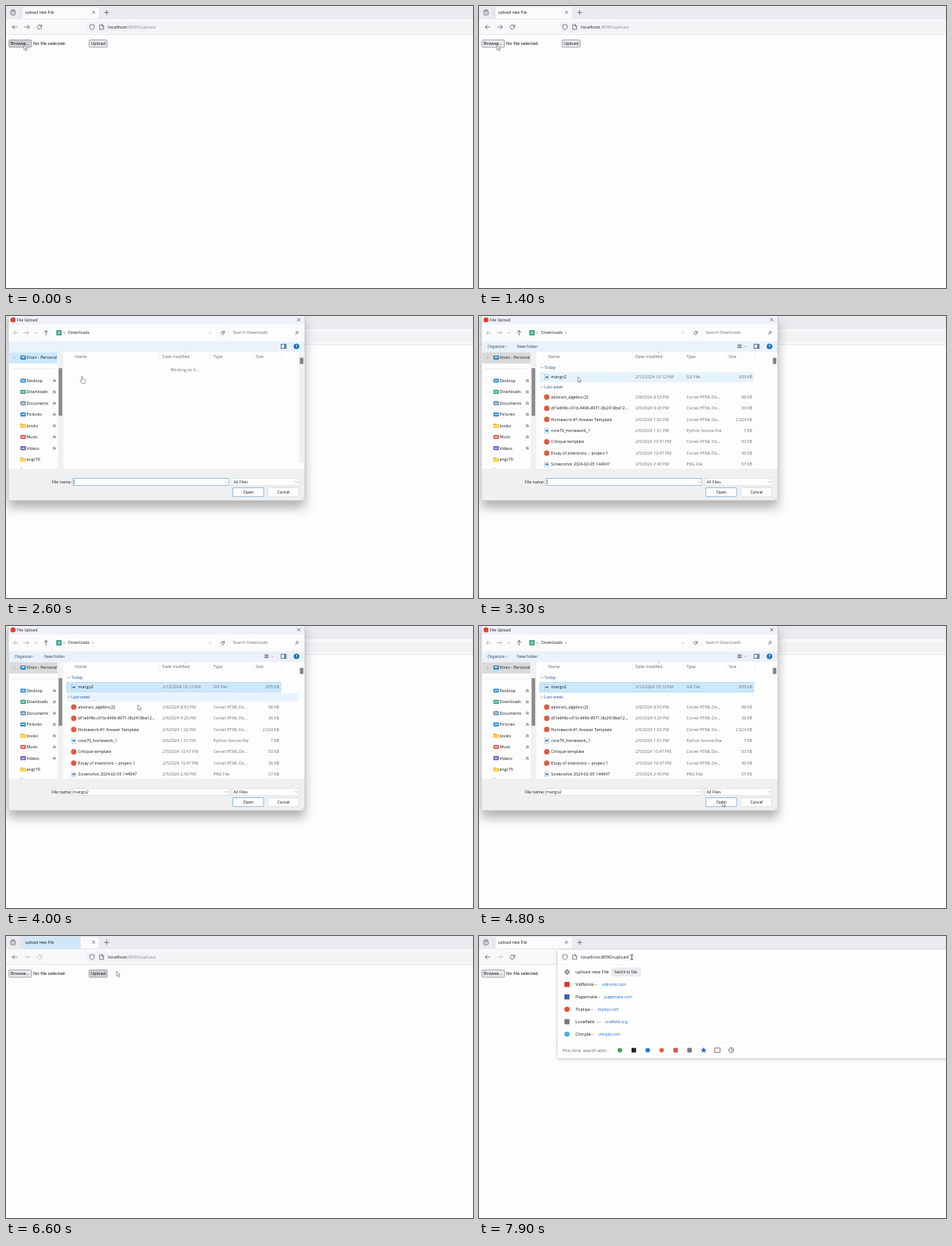
Animation, 600 px wide and 362 px high, one loop 8000 ms. Source, as an HTML page:

```html
<!DOCTYPE html>
<html lang="en">
<head>
<meta charset="utf-8">
<title>Upload form</title>
<style>
html, body { margin: 0; width: 100%; height: 100%; overflow: hidden; background: #fdfdfd; }
svg { display: block; width: 600px; height: 362px; font-family: "Open Sans", "Noto Sans", sans-serif; }
text { white-space: pre; }
</style>
</head>
<body>
<svg id="stage" viewBox="0 0 600 362"></svg>
<script>
const INK = '#1b1b1f', DIM = '#6c6c70', ICON = '#4a4a52';
const LOOP = 8000, STEP = 100;

// Markup helpers; text is placed by its vertical middle.
const text = (x, y, s, size = 5.25, fill = INK, more = '') =>
  `<text x="${x}" y="${y + size * 0.36}" font-size="${size}" fill="${fill}" ${more}>${s}</text>`;
const rect = (x, y, w, h, fill, more = '') =>
  `<rect x="${x}" y="${y}" width="${w}" height="${h}" fill="${fill}" ${more}/>`;
const dot = (x, y, r, fill) => `<circle cx="${x}" cy="${y}" r="${r}" fill="${fill}"/>`;
const line = (d, color = ICON, w = 0.7, more = '') =>
  `<path d="${d}" fill="none" stroke="${color}" stroke-width="${w}" stroke-linecap="round" stroke-linejoin="round" ${more}/>`;
const group = (id, body, more = '') => `<g id="${id}" ${more}>${body}</g>`;
const border = (color, w = 0.5, r = 0) => `stroke="${color}" stroke-width="${w}" rx="${r}"`;
const folder = (x, y) =>
  `<path d="M${x - 3.7} ${y - 2.7}h2.8l1 1h3.6v4.6h-7.4z" fill="#f0b93a"/>` +
  rect(x - 3.7, y - 0.9, 7.4, 3.6, '#ffd563', 'rx=".5"');
const leftArrow = (x, y, c, s = 1) =>
  line(`M${x + 3 * s} ${y}H${x - 3 * s}m2.4 -2.4l-2.4 2.4l2.4 2.4`, c);
const rightArrow = (x, y, c) => line(`M${x - 3} ${y}H${x + 3}m-2.4 -2.4l2.4 2.4l-2.4 2.4`, c);
const cross = (x, y, r) => line(`M${x - r} ${y - r}l${2 * r} ${2 * r}m0 ${-2 * r}l${-2 * r} ${2 * r}`);
const chevron = (x, y, c = '#77777c') => line(`M${x - 1.4} ${y - 0.7}l1.4 1.4l1.4 -1.4`, c, 0.5);
const nextMark = (x, y, c) => line(`M${x - 0.6} ${y - 1.2}l1.2 1.2l-1.2 1.2`, c, 0.6);
const clockwise = (x, y, r) =>
  line(`M${x + r * 0.85} ${y - r * 0.5}A${r} ${r} 0 1 0 ${x + r} ${y + 0.4}M${x + r} ${y - r}v${r * 0.75}h${-r * 0.75}`);
const pageIcon = (x, y) => line(`M${x - 2.2} ${y - 3}h2.8l1.8 1.8v4.2h-4.6zM${x + 0.5} ${y - 3}v2h2`);

function browser() {
  const shield = line('M110.5 23.8l2.8 1v2.2c0 1.8 -1.2 3 -2.8 3.6c-1.6 -.6 -2.8 -1.8 -2.8 -3.6v-2.2z');
  return rect(0, 0, 600, 17, '#ebebef') +
    rect(0, 17, 600, 20, '#f8f8fa') +
    rect(0, 36.4, 600, 0.7, '#dedee2') +
    rect(104, 20, 500, 14, '#f3f3f6', 'rx="2"') +
    line('M6.2 6.8v3.6q0 1 1 1h3.6q1 0 1 -1v-3.6zM7 5h4M8 8.4l1 1l1 -1', ICON) +
    rect(18.2, 3, 0.6, 11, '#cfcfd5') +
    rect(21, 1, 99, 15.5, '#fbfbfd', border('#dcdce1', 0.4, 2)) +
    `<clipPath id="tabClip"><rect x="21" y="1" width="99" height="15.5" rx="2"/></clipPath>` +
    `<g clip-path="url(#tabClip)"><circle id="burst" cx="29" cy="8.5" fill="#69b9ec"/></g>` +
    text(24.5, 8.2, 'upload new File', 5.1) + cross(112.5, 8, 1.6) +
    line('M126.6 8.3h5.4m-2.7 -2.7v5.4') +
    leftArrow(11, 27, ICON) + group('forward', rightArrow(27, 27, ICON)) +
    group('reload', clockwise(43, 27, 2.8)) + shield + pageIcon(123, 27) +
    text(131, 27, 'localhost<tspan fill="#8b8b93">:8090/upload</tspan>', 5.9);
}

function page() {
  return rect(3.8, 43.6, 29, 9.4, '', 'id="browse" ' + border('#85858c', 0.7, 1.4)) +
    text(6, 48.2, 'Browse...', 5.7, '#000') +
    `<text id="picked" x="35" y="50.3" font-size="5.7"></text>` +
    rect(106.8, 43.6, 23.2, 9.4, '', 'id="upload" ' + border('#85858c', 0.7, 1.4)) +
    text(109.3, 48.2, 'Upload', 5.5, '#000');
}

function sidebar() {
  const items = [['Desktop', '#2a8fd8'], ['Downloads', '#3aa77a'], ['Documents', '#6e8fae'],
    ['Pictures', '#2c8de0'], ['books'], ['Music', '#d9544f'], ['Videos', '#7b57c2'], ['engr79']];
  const rows = items.map(([name, color], i) => {
    const y = 83 + i * 14.45;
    const icon = color ? rect(18.5, y - 2.6, 7, 5.2, color, 'rx=".8"') +
      rect(20, y - 0.6, 4, 1.3, '#fff', 'opacity=".8"') : folder(22, y);
    const pin = i < 7 ? line(`M60.2 ${y + 1.8}l1.4 -1.4m-.9 -1.4l2.3 2.3m-1.8 -1.8l1.1 -1.2l1.7 1.7l-1.2 1.1`, '#66666b', 0.8) : '';
    return icon + text(26.5, y, name) + pin;
  }).join('');
  return `<clipPath id="sideClip"><rect x="3" y="46" width="63.2" height="150"/></clipPath>` +
    `<g clip-path="url(#sideClip)">` + rect(4, 46.5, 63, 14.5, '', 'id="account"') +
    nextMark(11, 53.5, '#888') + rect(18.5, 50.8, 7, 5.2, '#2a7fd0', 'rx="1"') +
    rect(20.4, 52, 3.2, 2, '#d8ecfb') + text(27, 53.6, 'Kiran - Personal') +
    rect(8, 67.7, 54, 0.6, '#d6d6d9') + rows + folder(22, 198) + '</g>' +
    rect(66.5, 46, 7.2, 150, '#f1f1f2') + rect(67.6, 67, 4.6, 61, '#8a8a8d');
}

function fileRows() {
  const web = 'Corvel HTML Do...';
  const files = [
    ['abstract_algebra (2)', '2/8/2024 8:53 PM', web, '98 KB'],
    ['df1e6f4b-c91b-4496-8971-0b2418be12...', '2/6/2024 9:26 PM', web, '36 KB'],
    ['Homework #1 Answer Template', '2/6/2024 1:02 PM', web, '2,524 KB'],
    ['core79_homework_1', '2/6/2024 1:01 PM', 'Python Source File', '7 KB'],
    ['Critique template', '2/5/2024 10:47 PM', web, '50 KB'],
    ['Essay of intentions -- project 1', '2/5/2024 10:47 PM', web, '36 KB'],
    ['Screenshot 2024-02-05 144047', '2/5/2024 2:40 PM', 'PNG File', '57 KB']];
  const row = (y, [name, date, type, size]) => {
    const icon = type === web ? dot(87, y, 3.5, '#dd5a42') :
      rect(84.6, y - 3.2, 5, 6.4, '#fff', border('#9aa4b0', 0.5)) + rect(85.4, y - 1.2, 3.4, 2.4, '#3b82bd');
    return icon + text(92.5, y, name) + text(201, y, date, 5.25, DIM) + text(266.5, y, type, 5.25, DIM) +
      text(351, y, size, 5.25, DIM, 'text-anchor="end"');
  };
  const heading = (y, s) => chevron(80.8, y, '#3165a8') + text(84, y, s, 5.25, '#26589f');
  return rect(78, 72.2, 275, 12.8, '', 'id="chosen" stroke-width=".5"') +
    rect(78, 86, 298, 11, '#eaf3fc', 'id="weekHover"') +
    heading(66.3, 'Today') + row(78.6, ['mango2', '2/12/2024 10:12 PM', 'GIF File', '655 KB']) +
    heading(91.3, 'Last week') + files.map((f, i) => row(104 + i * 14.4, f)).join('');
}

function dialog() {
  const columns = [['Name', 89], ['Date modified', 201], ['Type', 266.5], ['Size', 321]];
  const button = (x, s, c) => rect(x, 220.4, 39.6, 11.4, '#fdfdfd', border(c, 0.6, 0.4)) +
    text(x + 20, 226.2, s, 5.25, INK, 'text-anchor="middle"');
  return rect(3, -3, 381, 240, '#fdfdfd', 'rx="3" filter="url(#shade)"') +
    rect(3, 0, 381, 11, '#eff2f9') + rect(3, 11, 381, 21.5, '#fafbfd') +
    rect(3, 32.5, 381, 13.5, '#ebf1f9') +
    dot(9, 5, 3.2, '#e2412b') + text(14, 5.2, 'File Upload', 5.1) + cross(376, 4.8, 1.7) +
    leftArrow(12, 21.5, '#a5a5aa', 0.8) + rightArrow(26, 21.5, '#a5a5aa') + chevron(38.5, 21.7) +
    line('M51.5 24.5v-6m-2.4 2.4l2.4 -2.4l2.4 2.4') +
    rect(60, 15.2, 210, 12.8, '#fff', border('#eceef1', 0.4, 1)) +
    rect(64.5, 18, 7, 7, '#43a383', 'rx="1"') + line('M68 19.5v3.4m-1.4 -1.4l1.4 1.4l1.4 -1.4', '#fff') +
    nextMark(75, 21.6, '#555') + text(80, 21.6, 'Downloads') +
    group('pathEnd', nextMark(111.5, 21.6, '#555')) +
    chevron(262, 21.7) + clockwise(278.4, 21.7, 2) +
    rect(287.5, 15.2, 92.5, 12.8, '#fff', border('#eceef1', 0.4, 1)) +
    text(291.5, 21.6, 'Search Downloads', 5.2, DIM) +
    line('M372 23.6l1.5 -1.5') + '<circle cx="374.2" cy="21" r="1.5" fill="none" stroke="#4a4a52" stroke-width=".6"/>' +
    group('commands', text(11, 39.2, 'Organize', 5.2, '#1d3c6b') + chevron(34.8, 39.4) +
      text(49, 39.2, 'New folder', 5.2, '#1d3c6b') +
      line('M332.5 37h4.6m-4.6 1.8h4.6m-4.6 1.8h4.6', '#55555c', 0.9) + chevron(342.5, 39.2)) +
    rect(353.5, 36.2, 6.4, 5.4, '#fff', border('#44566f', 0.8)) + rect(357.2, 36.5, 2.6, 4.8, '#4a83bd') +
    dot(373.2, 39, 3.6, '#1670bd') + text(373.2, 39, '?', 5, '#fff', 'text-anchor="middle" font-weight="700"') +
    sidebar() +
    columns.map(([s, x]) => text(x, 52.6, s, 5.25, '#5d6269')).join('') +
    columns.slice(1).map(([, x]) => rect(x - 4, 47, 0.4, 11, '#e3e5e8')).join('') +
    rect(354, 47, 0.4, 11, '#e3e5e8') +
    line('M229.6 47.3l1.4 -1.2l1.4 1.2', '#888', 0.4) +
    rect(376.6, 47, 6.4, 142, '#f0f0f1', 'id="track"') + rect(377.5, 53.7, 4.6, 7.8, '#848487') +
    group('working', text(211.5, 69, 'Working on it...', 5.25, DIM)) +
    `<clipPath id="listClip"><rect x="74" y="59" width="302.5" height="137"/></clipPath>` +
    group('list', fileRows(), 'clip-path="url(#listClip)"') +
    `<path d="M3 196H384V234q0 3 -3 3H6q-3 0 -3 -3z" fill="#f0f0f0"/>` +
    text(59, 213, 'File name:') +
    rect(86, 208.4, 200, 9.2, '#fff', 'id="nameBox" stroke-width=".6"') +
    chevron(282.5, 213.1) + group('caret', rect(87.3, 210, 0.5, 6, '#222')) +
    group('fileName', text(86, 213, 'mango2')) +
    rect(290.5, 208.4, 85.5, 9.2, '#fff', border('#d2d2d4')) + text(292.5, 213, 'All Files') + chevron(373, 213.1) +
    button(291.4, 'Open', '#4a97d2') + button(336.6, 'Cancel', '#d2d2d4') +
    line('M380 236l2.5 -2.5', '#aaa', 0.6) +
    '<path d="M3 0V234q0 3 3 3H381q3 0 3 -3V0" fill="none" stroke="#a9abb0" stroke-width=".5"/>';
}

function suggestions() {
  const sites = [['VidNook', 'vidnook.com', 158, '#e53227', 0], ['Pagemate', 'pagemate.com', 161, '#3f5fa8', 0],
    ['Topiqa', 'topiqa.com', 152.5, '#ee4a28', 1], ['Lorefield', 'lorefield.org', 162, '#777', 0],
    ['Chirple', 'chirple.com', 153.5, '#48a9e6', 1]];
  const mark = (x, y, c, round, r = 3.3) => round ? dot(x, y, r, c) : rect(x - r, y - r, 2 * r, 2 * r, c);
  const rows = sites.map(([name, url, x, c, round], i) => {
    const y = 62.2 + i * 15.95;
    return mark(113, y, c, round) + text(124, y, name, 5.9) +
      text(x - 11.2, y, '—', 5.9, '#77777f') + text(x, y, url, 5.15, '#2266c8');
  }).join('');
  const engines = [['#4b9a5c', 1], ['#222', 0], ['#2678cf', 1], ['#de6438', 1], ['#d9534a', 0], ['#777', 0]];
  const star = Array.from({ length: 10 }, (_, i) => {
    const r = i % 2 ? 1.8 : 3.9, a = i * Math.PI / 5;
    return `${288.6 + r * Math.sin(a)},${146.7 - r * Math.cos(a)}`;
  }).join(' ');
  return rect(101, 18, 520, 139, '#fefefe', 'rx="2.5" filter="url(#soft)"') +
    line('M110.5 23.8l2.8 1v2.2c0 1.8 -1.2 3 -2.8 3.6c-1.6 -.6 -2.8 -1.8 -2.8 -3.6v-2.2z') + pageIcon(123, 27) +
    rect(130.5, 22.8, 61.5, 8.6, '#b5d8f7', 'id="selection"') +
    text(131, 27, 'localhost:8090/upload', 5.9) +
    rect(105, 36.5, 495, 0.4, '#ededf0') +
    line('M110.2 46.3a3 3 0 1 0 6 0a3 3 0 1 0 -6 0h6M113.2 43.3q-2.8 3 0 6q2.8 -3 0 -6', ICON, 0.6) +
    text(124, 46.3, 'upload new File', 5.9) +
    rect(170, 40.5, 38, 11.6, '#ebebee', 'rx="1.5"') + text(174, 46.3, 'Switch to Tab', 4.75) +
    rows + rect(102, 136, 498, 0.4, '#ededf0') +
    text(107, 146.8, 'This time, search with:', 5.55, '#5f5f68') +
    engines.map(([c, round], i) => mark(181 + i * 17.9, 146.6, c, round, 2.9)).join('') +
    `<polygon points="${star}" fill="#315cc8"/>` +
    line('M303.2 143.8h6.6v5.6h-6.6z') +
    line('M320.9 146.6a3.2 3.2 0 1 0 6.4 0a3.2 3.2 0 1 0 -6.4 0M324.1 144.6v2.1h1.7', ICON);
}

function pointers() {
  const edge = 'stroke="#55555a" stroke-width=".55" stroke-linejoin="round"';
  return group('arrow', `<path d="M0 0V6.6L1.5 5.2L2.6 7.7L3.7 7.2L2.6 4.8H4.7Z" fill="#fff" ${edge}/>`) +
    group('hand', `<path d="M0 .6q0 -.9 .7 -.9q.7 0 .7 .9v2.8q2.6 .1 3.5 .8q.6 .5 .2 2.5l-.8 2.5h-3.8l-2.3 -3q-.5 -1 .5 -1l1.3 .8z" fill="#fff" ${edge}/>`) +
    group('beam', line('M-1.5 -3.2q1.5 0 1.5 .8v4.8q0 .8 -1.5 .8M1.5 -3.2q-1.5 0 -1.5 .8M0 2.4q0 .8 1.5 .8', '#222', 0.8));
}

const stage = document.getElementById('stage');
stage.innerHTML = `<defs>
  <filter id="shade" x="-15%" y="-15%" width="130%" height="135%"><feDropShadow dx="0" dy="9" stdDeviation="7" flood-opacity=".3"/></filter>
  <filter id="soft" x="-5%" y="-10%" width="110%" height="125%"><feDropShadow dx="0" dy="1" stdDeviation="2" flood-opacity=".25"/></filter>
  </defs>` + browser() + page() + group('dialog', dialog()) + group('suggest', suggestions()) + pointers();

const el = {};
stage.querySelectorAll('[id]').forEach(node => el[node.id] = node);
const show = (name, on) => el[name].setAttribute('display', on ? 'inline' : 'none');
const set = (name, attr, value) => el[name].setAttribute(attr, value);

// Pointer path: time, x, y.
const path = [[0, 23, 50], [1500, 23, 50], [2300, 88, 74], [2600, 97, 77.5], [3100, 122, 78], [3500, 132, 78],
  [4000, 169.5, 101], [4700, 308, 224], [5000, 325, 229], [5100, 325, 229], [5400, 119, 46], [6300, 119, 46],
  [6600, 142, 45], [6700, 181, 44], [7100, 188, 28], [7600, 193, 27.5], [7900, 196.3, 27.2], [LOOP, 196.3, 27.2]];

function pointerAt(t) {
  const i = path.findIndex(p => p[0] > t);
  const [t0, x0, y0] = path[i - 1], [t1, x1, y1] = path[i];
  const k = (t - t0) / (t1 - t0), ease = k * k * (3 - 2 * k);
  return [x0 + (x1 - x0) * ease, y0 + (y1 - y0) * ease];
}

function render(t) {
  const within = (a, b) => t >= a && t < b;
  const loaded = t >= 2900, selected = t >= 3400;

  set('browse', 'fill', t < 600 ? '#d0d0d7' : t < 700 ? '#b1b1b9' : '#e9e9ed');
  set('upload', 'fill', within(5900, 6100) ? '#b1b1b9' : within(5400, 6700) ? '#d0d0d7' : '#e9e9ed');
  el.picked.textContent = within(5200, 6400) ? 'mango2.gif' : 'No file selected.';

  const burst = (t - 6500) / 375;
  show('burst', burst > 0 && burst < 1);
  set('burst', 'r', Math.max(0, burst) * 251);
  set('burst', 'opacity', Math.max(0, 0.4 * (1 - burst)));
  set('forward', 'opacity', t >= 6500 ? 0.35 : 1);
  set('reload', 'opacity', within(6500, 7000) ? 0.35 : 1);

  const opening = Math.min(1, (t - 1400) / 200), scale = 0.9 + 0.1 * opening;
  show('dialog', within(1500, 5000));
  set('dialog', 'opacity', Math.max(0, opening));
  set('dialog', 'transform', `translate(193 118) scale(${scale}) translate(-193 -118)`);
  set('account', 'fill', loaded ? '#dadadc' : '#cce8ff');
  for (const name of ['commands', 'list', 'pathEnd']) show(name, loaded);
  show('working', !loaded);
  show('track', !loaded);
  show('caret', !selected);
  show('fileName', selected);
  set('nameBox', 'stroke', selected ? '#d2d2d4' : '#5aa5da');
  set('chosen', 'fill', selected ? '#cce8ff' : '#e5f3ff');
  set('chosen', 'stroke', selected ? '#8fc9f2' : 'none');
  show('weekHover', within(3800, 4200));

  show('suggest', t >= 7200);
  show('selection', t < 7700);

  const [x, y] = pointerAt(t);
  const shape = within(2400, 2900) ? 'hand' : t >= 6900 ? 'beam' : 'arrow';
  for (const name of ['arrow', 'hand', 'beam']) show(name, name === shape);
  set(shape, 'transform', `translate(${x} ${y})`);
}

function tick(now) {
  render(Math.floor((now % LOOP) / STEP) * STEP);
  requestAnimationFrame(tick);
}
render(0);
requestAnimationFrame(tick);
</script>
</body>
</html>
```
